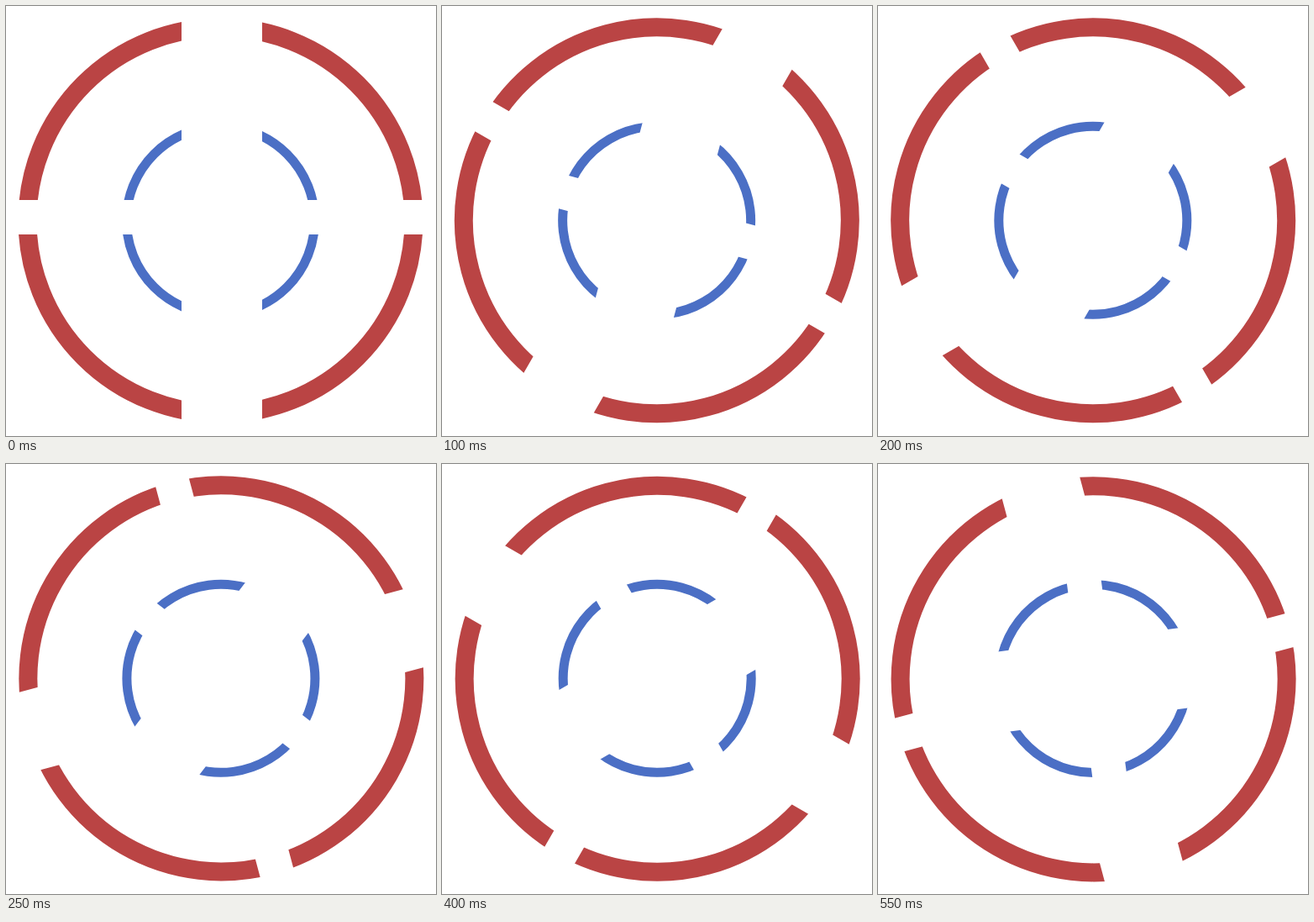
An HTML page for the animation above (600 ms loop, 512 px wide and 512 px high).

```html
<!DOCTYPE html>
<html lang="en">
<head>
<meta charset="utf-8">
<title>Rotating rings</title>
<style>
  html, body { margin: 0; width: 100%; height: 100%; overflow: hidden; background: #fff; }
  svg { display: block; width: 100%; height: 100%; }
  circle { fill: none; }
</style>
</head>
<body>
<svg viewBox="0 0 512 512">
  <defs>
    <!-- four quadrants, leaving a wide and a narrow gap -->
    <clipPath id="quads">
      <path d="M0 0H209V231H0ZM305 0H512V231H305ZM0 272H209V512H0ZM305 272H512V512H305Z"/>
    </clipPath>
  </defs>
  <g id="outer" clip-path="url(#quads)">
    <circle cx="255.5" cy="255.5" r="230" stroke="#ba4444" stroke-width="22"/>
  </g>
  <g id="inner" clip-path="url(#quads)">
    <circle cx="255.5" cy="255.5" r="112" stroke="#4b6fc5" stroke-width="11"/>
  </g>
</svg>
<script>
  const LOOP = 600, STEP = 50;
  const outer = document.getElementById('outer');
  const inner = document.getElementById('inner');

  const turn = (el, deg) => el.setAttribute('transform', `rotate(${deg} 256 256)`);

  // Both rings move in hard steps; the outer one turns twice as fast.
  function draw(ms) {
    const p = Math.floor((ms % LOOP) / STEP) * STEP / LOOP;
    turn(outer, 180 * p);
    turn(inner, 90 * p);
  }

  function tick() {
    draw(performance.now());
    requestAnimationFrame(tick);
  }
  tick();
</script>
</body>
</html>
```
